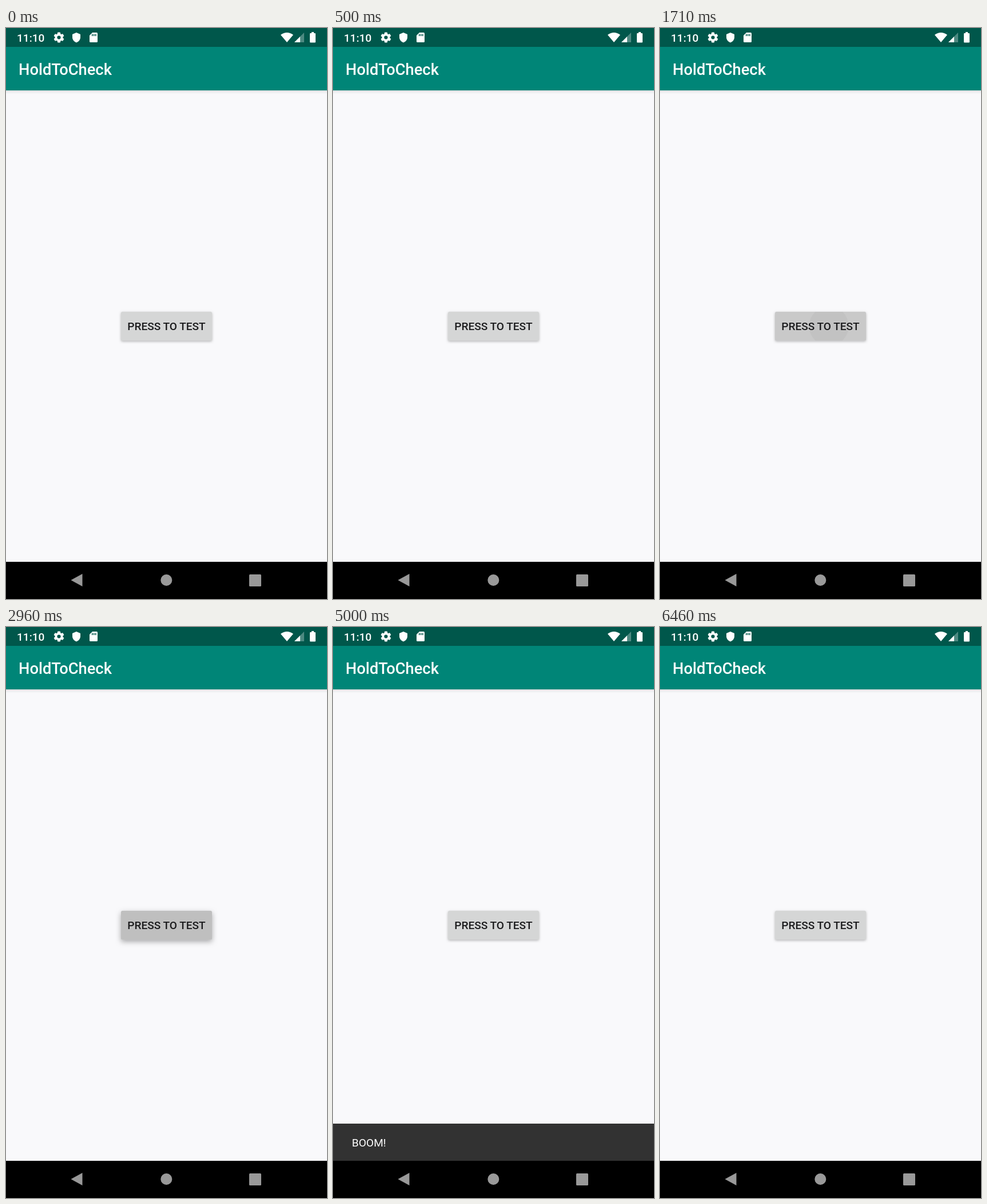
Recreate the animation shown at these times as an HTML page with a canvas. Size 561 px wide and 998 px high, loop 6500 ms.

```html
<!DOCTYPE html>
<html lang="en">
<head>
<meta charset="utf-8">
<title>HoldToCheck</title>
<style>
  html, body { margin: 0; width: 561px; height: 998px; overflow: hidden; background: #f9f9fb; }
  canvas, svg { position: absolute; left: 0; top: 0; display: block; }
  text { font-family: Roboto, sans-serif; font-size: 19.1px; fill: #fff; }
  .medium { font-weight: 500; }
</style>
</head>
<body>
<canvas id="stage" width="561" height="998"></canvas>
<!-- Ends at the navigation bar, so the message slides out beneath it. -->
<svg width="561" height="933">
  <text class="medium" x="19" y="24">11:10</text>
  <text class="medium" x="22" y="81.5" style="font-size:27.3px">HoldToCheck</text>
  <text class="medium" x="280.5" y="528" text-anchor="middle" style="fill:#1b1b1d">PRESS TO TEST</text>
  <text id="message" x="33" y="908" opacity="0">BOOM!</text>
</svg>
<script>
const LOOP = 6500;
const NAV_TOP = 933;
const BAR_HEIGHT = 65;
const PRESS = 1660, RELEASE = 2985;
const SHOW = 2990, HIDE = 5985;
const BUTTON = { x: 201, y: 496, w: 159, h: 50.5, r: 2.5 };

const ctx = document.getElementById('stage').getContext('2d');
const message = document.getElementById('message');

const progress = (t, start, length) => Math.min(1, Math.max(0, (t - start) / length));
const easeInOut = p => p * p * (3 - 2 * p);
const easeOut = p => 1 - (1 - p) ** 2;
const mix = (a, b, p) => a + (b - a) * p;

function rect(color, x, y, w, h) {
  ctx.fillStyle = color;
  ctx.fillRect(x, y, w, h);
}

function circle(color, x, y, r) {
  ctx.fillStyle = color;
  ctx.beginPath();
  ctx.arc(x, y, r, 0, Math.PI * 2);
  ctx.fill();
}

function polygon(color, ...points) {
  ctx.fillStyle = color;
  ctx.beginPath();
  points.forEach(([x, y]) => ctx.lineTo(x, y));
  ctx.fill();
}

function roundRect(color, x, y, w, h, r) {
  ctx.fillStyle = color;
  ctx.beginPath();
  ctx.roundRect(x, y, w, h, r);
  ctx.fill();
}

function drawGear(x, y) {
  ctx.save();
  ctx.translate(x, y);
  for (let i = 0; i < 6; i++) {
    polygon('#fff', [-3, -6], [-2.1, -9], [2.1, -9], [3, -6]);
    ctx.rotate(Math.PI / 3);
  }
  circle('#fff', 0, 0, 6.8);
  circle('#00574b', 0, 0, 3.1);
  ctx.restore();
}

function drawStatusIcons() {
  drawGear(92.5, 16.5);

  ctx.fill(new Path2D(''));
  ctx.fillStyle = '#fff';
  ctx.fill(new Path2D('M123 8 L130 11 V16 C130 20.5 127 24 123 25.5 C119 24 116 20.5 116 16 V11 Z'));

  ctx.fill(new Path2D('M151 8 H158.5 Q160 8 160 9.5 V23.5 Q160 25 158.5 25 H147.5 Q146 25 146 23.5 V13 Z'));
  for (const x of [150, 153, 156]) rect('#00574b', x, 10.5, 1.6, 3.6);

  ctx.fillStyle = '#fff';
  ctx.fill(new Path2D('M491 25 L480 12 Q491 4 502 12 Z'));

  polygon('#4d8981', [504, 25], [521, 8], [521, 25]);
  polygon('#fff', [504, 25], [514, 15], [514, 25]);

  roundRect('#fff', 531, 9, 10, 16.5, 1.2);
  rect('#fff', 534, 7, 4, 3);
}

function drawBars() {
  rect('#f9f9fb', 0, 0, 561, 998);
  const shadow = ctx.createLinearGradient(0, 109, 0, 116);
  shadow.addColorStop(0, 'rgba(0,0,0,.13)');
  shadow.addColorStop(0.4, 'rgba(0,0,0,.04)');
  shadow.addColorStop(1, 'rgba(0,0,0,0)');
  rect(shadow, 0, 109, 561, 7);
  rect('#008577', 0, 33, 561, 76);
  rect('#00574b', 0, 0, 561, 33);
  drawStatusIcons();
}

function drawButton(t) {
  const { x, y, w, h, r } = BUTTON;
  const lift = easeInOut(progress(t, PRESS + 45, 100)) - easeInOut(progress(t, RELEASE + 100, 100));
  const fade = 1 - progress(t, RELEASE, 150);

  ctx.save();
  ctx.shadowColor = `rgba(0,0,0,${mix(0.27, 0.33, lift)})`;
  ctx.shadowBlur = mix(4, 10, lift);
  ctx.shadowOffsetY = mix(1.4, 3.5, lift);
  roundRect('#d5d6d6', x, y, w, h, r);
  ctx.restore();

  if (t < PRESS || fade === 0) return;
  ctx.save();
  ctx.beginPath();
  ctx.roundRect(x, y, w, h, r);
  ctx.clip();
  rect(`rgba(0,0,0,${0.06 * progress(t, PRESS, 40) * fade})`, x, y, w, h);
  const spread = easeOut(progress(t, PRESS, 225));
  circle(`rgba(0,0,0,${0.05 * progress(t, PRESS, 75) * fade})`, mix(305, 280.5, spread), 521, 86 * spread);
  ctx.restore();
}

function drawSnackbar(t) {
  const shown = easeInOut(progress(t, SHOW, 250)) - easeInOut(progress(t, HIDE, 250));
  const offset = BAR_HEIGHT * (1 - shown);
  if (shown > 0) rect('#323232', 0, NAV_TOP - BAR_HEIGHT + offset, 561, BAR_HEIGHT);
  message.setAttribute('y', 908 + offset);
  message.setAttribute('opacity', progress(t, SHOW + 70, 180) - progress(t, HIDE, 180));
}

function drawNavigation() {
  const gray = '#999';
  rect('#000', 0, NAV_TOP, 561, 65);
  polygon(gray, [113.5, 965], [133.5, 954], [133.5, 976]);
  circle(gray, 280.3, 965, 10);
  roundRect(gray, 425, 955, 21, 21, 1.5);
}

function render(now) {
  const t = now % LOOP;
  drawBars();
  drawButton(t);
  drawSnackbar(t);
  drawNavigation();
}

const start = performance.now();
function tick() {
  render(performance.now() - start);
  requestAnimationFrame(tick);
}
tick();
</script>
</body>
</html>
```
